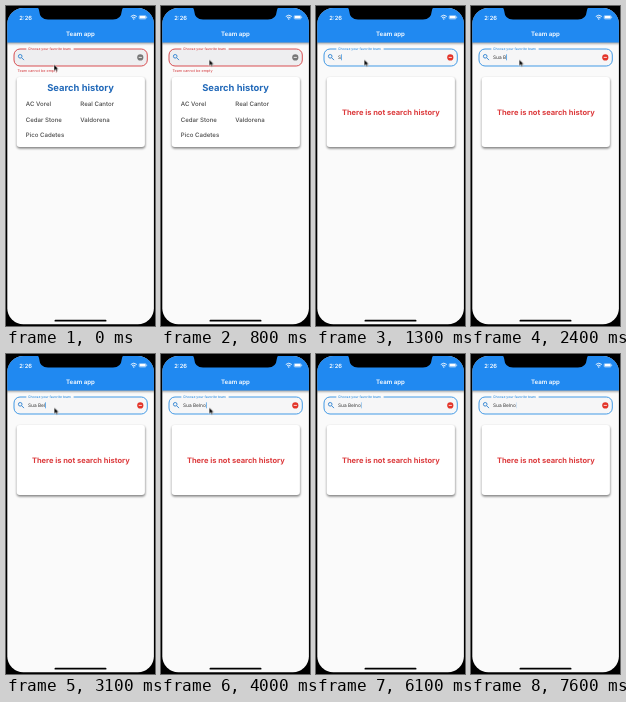
Animation of 149 by 320 pixels, one loop 7.7 s. Source, as an HTML page:

```html
<!DOCTYPE html>
<html lang="en">
<head>
<meta charset="utf-8">
<title>Team app</title>
<style>
  html, body { margin: 0; width: 100%; height: 100%; overflow: hidden; background: #000; }
  svg { display: block; width: 100vw; height: 100vh; }
  text { font-family: Inter, Roboto, sans-serif; text-rendering: geometricPrecision; white-space: pre; }
  .mid { text-anchor: middle; }
  .bar { fill: #fff; font-weight: 600; }
  .items { font-size: 6.1px; font-weight: 500; fill: #484848; }
  .before, .after, .field, .fill, .minus, .pointer, #caret { animation: 7.7s linear infinite; }
  .before { animation-name: before; }
  .after { animation-name: after; }
  .field { animation-name: field; }
  .fill { animation-name: fill; }
  .minus { animation-name: minus; }
  .pointer { animation-name: pointer; }
  #caret { animation-name: blink; }

  /* The first letter arrives at 900 ms */
  @keyframes before { 0%, 11.68% { opacity: 1; } 11.69%, 100% { opacity: 0; } }
  @keyframes after { 0%, 11.68% { opacity: 0; } 11.69%, 100% { opacity: 1; } }
  @keyframes minus { 0%, 11.68% { fill: #777; } 11.69%, 100% { fill: #e33429; } }
  @keyframes fill { 0%, 11.68% { fill: #eeeef0; } 11.69%, 100% { fill: #f6f6f7; } }
  @keyframes field { 0%, 13.2% { color: #d43b3f; } 16.9%, 100% { color: #2e8fe2; } }
  @keyframes pointer {
    0%, .6% { transform: translate(48px, 58.5px); opacity: 1; animation-timing-function: ease-in-out; }
    10.4%, 59% { transform: translate(48.2px, 53.5px); opacity: 1; animation-timing-function: ease-out; }
    63.6%, 64.9% { transform: translate(49.6px, 62px); opacity: 1; }
    64.93%, 100% { transform: translate(49.6px, 62px); opacity: 0; }
  }
  @keyframes blink {
    0%, 11.68% { opacity: 0; }
    11.69%, 51.6% { opacity: 1; }
    55.8%, 58.8% { opacity: 0; }
    62.3%, 64.6% { opacity: 1; }
    68.8%, 71.8% { opacity: 0; }
    75.3%, 77.6% { opacity: 1; }
    81.8%, 84.8% { opacity: 0; }
    88.3%, 90.6% { opacity: 1; }
    94.8%, 97.8% { opacity: 0; }
    100% { opacity: .6; }
  }
</style>
</head>
<body>
<svg viewBox="0 0 149 320" preserveAspectRatio="none">
  <defs>
    <clipPath id="screen"><rect x="1.3" y="2" width="146.6" height="316.3" rx="16"/></clipPath>
    <filter id="soft" x="-10%" y="-20%" width="120%" height="140%"><feGaussianBlur stdDeviation="1"/></filter>
  </defs>
  <rect width="149" height="320"/>
  <g clip-path="url(#screen)">
    <rect width="149" height="320" fill="#fafafa"/>
    <rect x="-4" y="4" width="157" height="33.6" fill="#000" opacity=".4" filter="url(#soft)"/>
    <rect width="149" height="36.5" fill="#2089f1"/>
    <path d="M30 0 Q33 2 33.2 5 Q33.8 13.5 42 13.5 H107 Q115.2 13.5 115.8 5 Q116 2 119 0Z"/>

    <text class="bar" x="13.2" y="13.5" font-size="5.8">2:26</text>
    <g fill="none" stroke="#fff" stroke-width=".9">
      <path d="M124.8 10.5 Q127.8 7.8 130.8 10.5 M126 11.9 Q127.8 10.3 129.6 11.9"/>
      <rect x="133.1" y="9.5" width="7" height="3.6" rx="1" stroke-width=".4"/>
    </g>
    <circle cx="127.8" cy="13" r=".7" fill="#fff"/>
    <rect x="133.6" y="10" width="6" height="2.6" rx=".6" fill="#fff"/>
    <rect x="140.6" y="10.6" width=".5" height="1.4" fill="#fff"/>
    <text class="bar mid" x="74.5" y="30" font-size="6.1">Team app</text>

    <rect class="fill" x="8" y="43" width="133.3" height="17" rx="6"/>
    <g class="field">
      <path d="M67.5 43 H135.3 a6 6 0 0 1 6 6 V54 a6 6 0 0 1 -6 6 H14 a6 6 0 0 1 -6 -6 V49 a6 6 0 0 1 6 -6 H20.5"
        fill="none" stroke="currentColor" stroke-width=".9"/>
      <path d="M20.5 43 H67.5" stroke="#fafafa"/>
      <text x="22" y="44.4" font-size="3.4" font-weight="500" fill="currentColor">Choose your favorite team</text>
    </g>
    <g fill="none" stroke="#2a7fd0" stroke-width=".9">
      <circle cx="14.2" cy="50.3" r="1.8"/>
      <path d="M15.6 51.7 L18 54.1"/>
    </g>
    <text id="typed" x="22" y="53.2" font-size="4.8" fill="#333"></text>
    <rect id="caret" y="48.3" width=".7" height="6" fill="#2e8fe2"/>
    <circle class="minus" cx="134.3" cy="51.4" r="3.1"/>
    <path d="M132.7 51.4 h3.2" stroke="#fff" stroke-width=".8"/>
    <text class="before" x="11.4" y="66.4" font-size="3.7" fill="#d43b3f">Team cannot be empty</text>

    <rect x="10.8" y="72.2" width="128.4" height="70.4" rx="3" opacity=".5" filter="url(#soft)"/>
    <rect x="10.7" y="71" width="128.2" height="70" rx="3" fill="#fff"/>
    <g class="before">
      <text class="mid" x="74.6" y="85" font-size="9.4" font-weight="700" fill="#2068b8">Search history</text>
      <g class="items">
        <text x="19.8" y="100.4">AC Vorel</text>
        <text x="74.3" y="100.4">Real Cantor</text>
        <text x="19.8" y="115.7">Cedar Stone</text>
        <text x="74.3" y="115.7">Valdorena</text>
        <text x="19.8" y="131">Pico Cadetes</text>
      </g>
    </g>
    <text class="after mid" x="74.8" y="109" font-size="7.5" font-weight="700" fill="#dc3a3c">There is not search history</text>

    <rect x="48.5" y="313.8" width="52" height="1.8" rx=".9"/>
  </g>
  <path class="pointer" d="M0 0 V6.5 L1.6 5.1 2.6 7.3 3.7 6.8 2.7 4.7 H4.7Z"
    stroke="#fff" stroke-width=".5"/>
</svg>
<script>
  const LOOP = 7700;
  const team = "Sua Belno";
  const keyTimes = [900, 1900, 2000, 2100, 2400, 2700, 2900, 3200, 3400];
  const typed = document.getElementById("typed");
  const caret = document.getElementById("caret");

  function draw() {
    const t = performance.now() % LOOP;
    const count = keyTimes.filter(k => k <= t).length;
    typed.textContent = team.slice(0, count);
    caret.setAttribute("x", 22.2 + (count ? typed.getComputedTextLength() : 0));
    requestAnimationFrame(draw);
  }
  draw();
</script>
</body>
</html>
```
